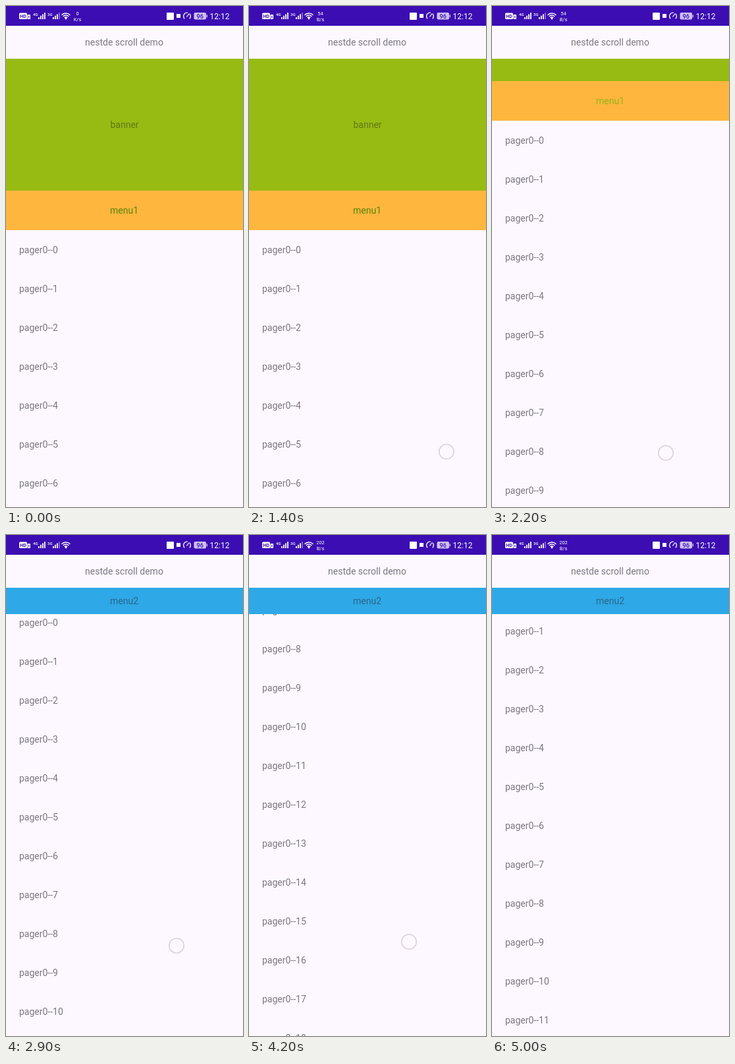
An HTML page with a canvas that plays this animation: 360 by 760 pixels, repeating every 5100 ms.

```html
<!DOCTYPE html>
<html lang="en">
<head>
<meta charset="utf-8">
<title>Nested scroll</title>
<style>
html, body { margin: 0; width: 100%; height: 100%; overflow: hidden; background: #fdf8ff; }
canvas { display: block; }
</style>
</head>
<body>
<canvas id="stage" width="360" height="760"></canvas>
<script>
const c = document.getElementById('stage').getContext('2d');
const LOOP = 5100, STEP = 100, PAPER = '#fdf8ff', PURPLE = '#3b0db3';

// Tracks are lists of [time, value, ...], joined by straight lines.
const scrollTrack = [
  [1400, 0], [1500, 23], [1700, 82.5], [1900, 118], [2000, 125], [2200, 166],
  [2500, 203], [2900, 237], [3200, 270], [3400, 300], [3700, 430], [3850, 550],
  [4000, 635], [4100, 662], [4200, 669], [4500, 546], [4600, 450], [4700, 370],
  [4800, 310], [4900, 285], [5000, 283]
];
const touches = [
  [[1400, 300, 676], [1700, 296, 594], [1900, 293, 558]],
  [[2000, 266, 719], [2200, 264, 678], [2900, 259, 623], [3200, 257, 590]],
  [[3400, 252, 690], [3700, 248, 560]],
  [[4200, 243, 617], [4500, 240, 740]]
];
const speeds = [[0, '0', 'K/s'], [500, '54', 'B/s'], [2700, '', ''], [3400, '202', 'B/s']];

function sample(track, t) {
  const i = track.findIndex(p => p[0] > t);
  if (i === 0) return track[0].slice(1);
  if (i < 0) return track[track.length - 1].slice(1);
  const a = track[i - 1], b = track[i], k = (t - a[0]) / (b[0] - a[0]);
  return a.slice(1).map((v, j) => v + (b[j + 1] - v) * k);
}

function rect(x, y, w, h, color) {
  c.fillStyle = color;
  c.fillRect(x, y, w, h);
}

function box(x, y, w, h, r, color) {
  c.fillStyle = color;
  c.beginPath();
  c.roundRect(x, y, w, h, r);
  c.fill();
}

function text(s, x, y, color, size = 14, align = 'center', weight = 400) {
  c.font = `${weight} ${size}px Roboto, sans-serif`;
  c.textAlign = align;
  c.fillStyle = color;
  c.fillText(s, x, y);
}

function arc(x, y, r, from, to, color, width) {
  c.strokeStyle = color;
  c.lineWidth = width;
  c.beginPath();
  c.arc(x, y, r, from * Math.PI, to * Math.PI);
  c.stroke();
}

function signal(x, label, full) {
  text(label, x, 14.5, '#fff', 6, 'left', 500);
  for (let i = 0; i < 4; i++) {
    const h = 3 + i * 2.3;
    rect(x + 8 + i * 3, 20 - h, 1.8, h, i < full ? '#fff' : '#8a6bd6');
  }
}

function statusBar(t) {
  rect(0, 0, 360, 30, PURPLE);
  box(20, 10.5, 12, 9.5, 1.5, '#fff');
  text('HD', 26, 18, PURPLE, 7, 'center', 700);
  box(32.5, 13, 4.5, 7, 1, '#fff');
  rect(34.2, 15, 1.2, 3, PURPLE);
  signal(41, '4G', 4);
  signal(63, '3G', 3);

  for (const r of [3, 6, 9]) arc(91, 20, r, 1.24, 1.76, '#fff', 1.4);
  c.fillStyle = '#fff';
  c.beginPath();
  c.arc(91, 19, 1.4, 0, 7);
  c.fill();

  const [, value, unit] = speeds.filter(s => s[0] <= t).pop();
  text(value, 108.5, 13.5, '#fff', 7.5);
  text(unit, 108.5, 22.5, '#fff', 7.5);

  box(244, 10, 11, 11, 1, '#fff');
  box(259, 12, 6, 6, 0, '#fff');
  arc(275, 15.5, 5.4, 0.75, 1.55, '#fff', 1.3);
  arc(275, 15.5, 5.4, 1.75, 2.25, '#fff', 1.3);
  c.beginPath();
  c.moveTo(274.5, 16.5);
  c.lineTo(278, 11.5);
  c.stroke();
  box(285.5, 10, 18.5, 10.5, 2, '#cfc0f1');
  rect(304.6, 13.3, 1.4, 4, '#cfc0f1');
  text('96', 294.7, 18.6, PURPLE, 9, 'center', 500);
  text('12:12', 309.5, 19.6, '#fff', 12, 'left');
}

function draw(t) {
  const [scroll] = sample(scrollTrack, t);
  const fade = Math.min(1, scroll / 166);
  rect(0, 0, 360, 760, PAPER);

  for (let i = 0; i < 30; i++) {
    const y = 375 + i * 59 - scroll;
    if (y > 80 && y < 780) text('pager0--' + i, 20, y, '#7c777f', 14, 'left');
  }

  rect(0, 80 - scroll, 360, 200, '#98bb13');
  text('banner', 180, 185 - scroll, `rgb(${98 + 18 * fade},${118 + 22 * fade},24)`);
  rect(0, 280 - scroll, 360, 60, '#ffb63e');
  text('menu1', 179.5, 315 - scroll, `rgb(${92 + 58 * fade},${132 + 48 * fade},${8 + 12 * fade})`);

  c.globalAlpha = Math.max(0, Math.min(1, (scroll - 200) / 20));
  rect(0, 80, 360, 40, '#2ea8e6');
  text('menu2', 179.5, 105, '#2b6688');
  c.globalAlpha = 1;

  rect(0, 30, 360, 50, PAPER);
  text('nestde scroll demo', 179.5, 60, '#7c777f');
  statusBar(t);

  const touch = touches.find(p => t >= p[0][0] && t <= p[p.length - 1][0]);
  if (touch) {
    const [x, y] = sample(touch, t);
    arc(x, y, 11.2, 0, 2, '#ddd5df', 1.8);
  }
}

function frame(now) {
  draw(Math.floor((now % LOOP) / STEP) * STEP);
  requestAnimationFrame(frame);
}
draw(0);
requestAnimationFrame(frame);
</script>
</body>
</html>
```
